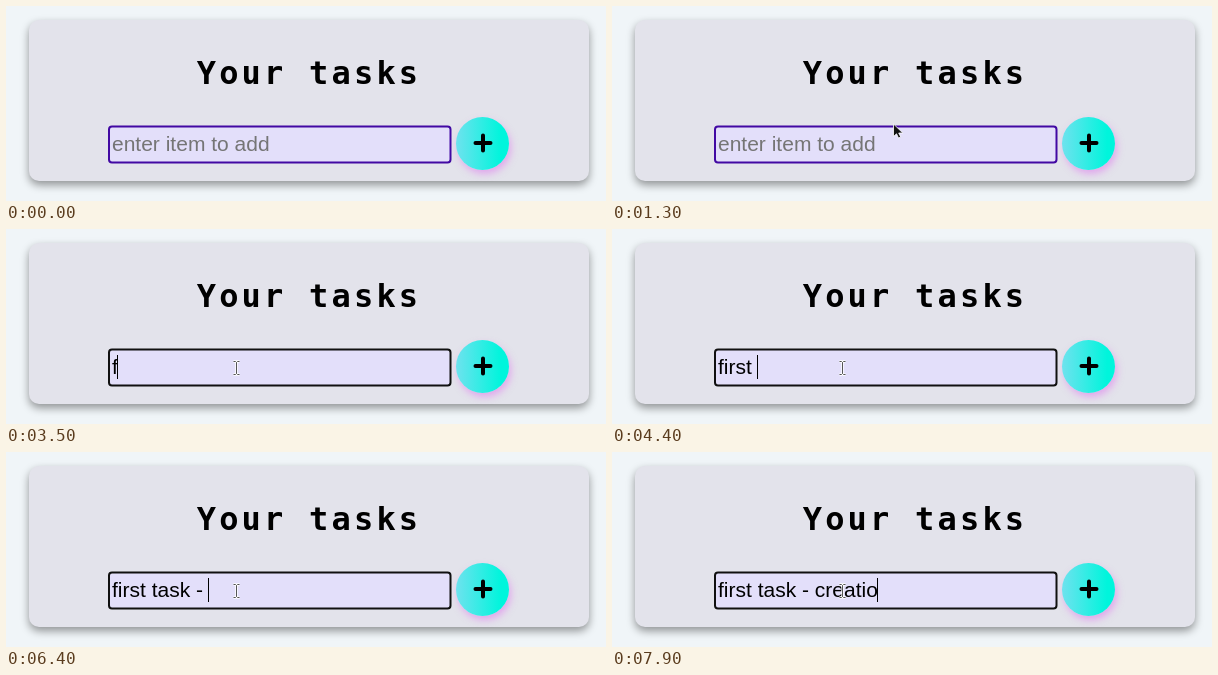
Write an HTML page that moves like this. It is 600 by 195 pixels and loops after 8 s.

```html
<!DOCTYPE html>
<html lang="en">
<head>
<meta charset="utf-8">
<title>Your tasks</title>
<style>
  html, body { margin: 0; width: 100%; height: 100%; overflow: hidden; background: #f0f5f8; }
  svg { display: block; }
  .card { position: absolute; left: 23px; top: 14px; width: 560px; height: 161px; border-radius: 10px;
    background: #e3e3eb; box-shadow: 0 4px 9px rgba(0, 0, 0, .4); }
  .add { position: absolute; left: 450px; top: 111px; width: 53px; height: 53px; border-radius: 50%;
    background: linear-gradient(90deg, #6ee2ee, #00f5dc 85%); box-shadow: 2px 4px 7px rgba(224, 110, 240, .5); }
  svg { position: absolute; left: 0; top: 0; }
  h1 { position: absolute; left: 23px; top: 49px; width: 560px; margin: 0; text-align: center;
    font: bold 32px/37px "DejaVu Sans Mono", monospace; letter-spacing: 3.2px; color: #000; }
  #text { font: 21px "Liberation Sans", Arial, sans-serif; white-space: pre; }
</style>
</head>
<body>
<div class="card"></div>
<h1>Your tasks</h1>
<div class="add"></div>
<svg width="600" height="195" viewBox="0 0 600 195">
  <rect id="field" x="103" y="120.5" width="341.5" height="36" rx="3" fill="#e3dffa" stroke-width="2"/>
  <text id="text" x="106" y="145"></text>
  <rect id="caret" y="126" width="1" height="24"/>
  <path d="M469.5 137H484.5M477 129.5V144.5" stroke="#000" stroke-width="4" stroke-linecap="round"/>
  <path id="arrow" d="M0 0V12.5L3 9.8L5 14L7.2 13L5.2 9H9.3Z" fill="#111" stroke="#fff" stroke-width=".8"/>
  <g id="beam" fill="none">
    <path d="M-3 -6.5H-1L0 -5.5L1 -6.5H3M0 -5.5V5.5M-3 6.5H-1L0 5.5L1 6.5H3" stroke="#fff" stroke-width="2.4"/>
    <path d="M-3 -6.5H-1L0 -5.5L1 -6.5H3M0 -5.5V5.5M-3 6.5H-1L0 5.5L1 6.5H3" stroke="#555"/>
  </g>
</svg>
<script>
const $ = id => document.getElementById(id);
const LOOP = 8000, FOCUS = 1900;
const phrase = "first task - creatio";
// When each character of the phrase is typed
const keys = [3400, 3600, 3800, 3800, 4000, 4200, 4600, 5000, 5400, 5600,
  5800, 6100, 6300, 6500, 6700, 6900, 7100, 7300, 7500, 7700];
// Pointer path: time, x, y
const path = [[100, 370, 52], [900, 305, 94], [1300, 281, 118], [1800, 230, 139]];

function pointerAt(t) {
  const i = path.findIndex(p => p[0] > t);
  if (i < 0) return path[path.length - 1].slice(1);
  const [a, b] = [path[Math.max(i - 1, 0)], path[i]];
  const k = i ? (t - a[0]) / (b[0] - a[0]) : 0;
  return [1, 2].map(n => Math.round(a[n] + (b[n] - a[n]) * k));
}

function draw(now) {
  const t = Math.floor(now % LOOP / 100) * 100;
  const typed = phrase.slice(0, keys.filter(k => k <= t).length);
  const text = $("text");
  text.textContent = typed || "enter item to add";
  text.setAttribute("fill", typed ? "#000" : "#757575");
  $("field").setAttribute("stroke", t < FOCUS ? "#4209a3" : "#101010");

  const caretOn = t >= FOCUS && !(t >= 2500 && t < 3100);
  const end = typed ? text.getSubStringLength(0, typed.length) : 0;
  $("caret").setAttribute("x", Math.floor(106 + end));
  $("caret").setAttribute("visibility", caretOn ? "visible" : "hidden");

  const [x, y] = pointerAt(t), inField = y >= 120;
  const place = (id, shown) => {
    $(id).setAttribute("transform", `translate(${x + .5} ${y})`);
    $(id).setAttribute("visibility", shown ? "visible" : "hidden");
  };
  place("arrow", t >= 100 && !inField);
  place("beam", inField);
  requestAnimationFrame(() => draw(performance.now()));
}
draw(0);
</script>
</body>
</html>
```
